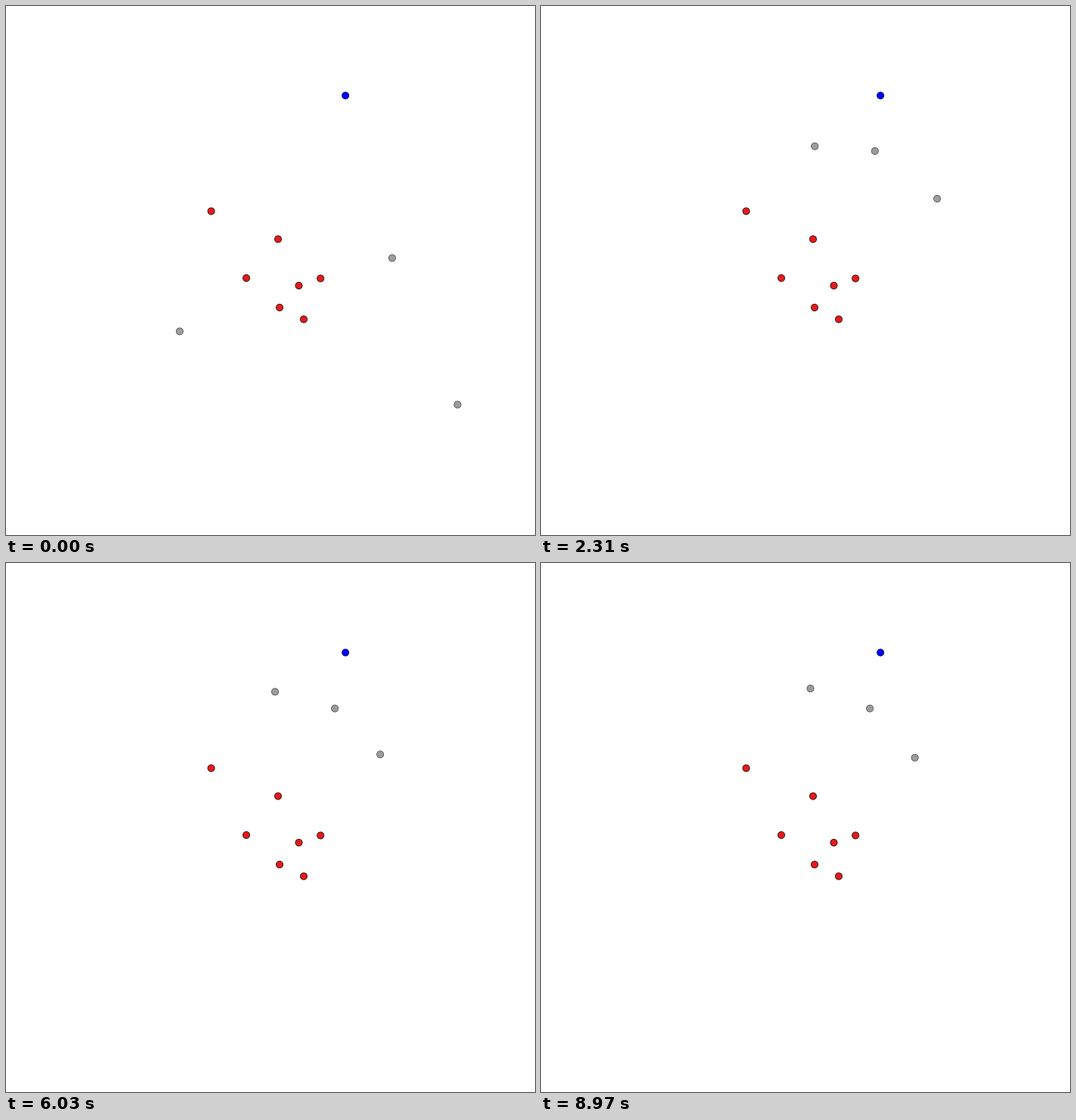
A matplotlib script that plays this animation: 700x700 px, repeating every 9 s.

```python
import numpy as np
import matplotlib.pyplot as plt
from matplotlib.animation import FuncAnimation
from matplotlib.patches import Circle

SIZE, DPI = 700, 100
FRAMES, INTERVAL = 300, 30

# Positions are complex numbers: x + y*1j, y pointing down
OBSTACLES = [271 + 271j, 359.5 + 308j, 317.5 + 359.5j, 387 + 369.5j,
             415.7 + 360j, 361.5 + 398.5j, 393.5 + 414j]
GOAL = 448.7 + 118j

# Each agent: start, gather, meet, fan out, rest
TIMES = np.array([0, 31, 47, 66, 97])
STOPS = np.array([
    [229.3 + 430j, 377 + 344j, 436.3 + 274j, 444 + 208j, 433 + 188.4j],
    [510.5 + 333j, 455 + 320j, 405 + 305j, 374 + 215j, 352 + 167.3j],
    [597 + 527j, 540 + 502j, 515 + 405j, 533 + 282j, 498.2 + 255.4j],
])

# At rest each agent steps round a small three-beat orbit
KICK = np.array([-1.1 - 2.4j, -2.5 - 0.3j, 2.5 + 0.3j])
SPIN = np.array([0, 1, 1])


def glide(n):
    """Smooth curve through the stops, at rest at both ends."""
    gap = np.diff(TIMES)
    slope = np.diff(STOPS) / gap
    speed = np.zeros_like(STOPS)
    speed[:, 1:-1] = ((gap[1:] * slope[:, :-1] + gap[:-1] * slope[:, 1:])
                      / (gap[1:] + gap[:-1]))
    n = min(n, TIMES[-1])
    i = min(np.searchsorted(TIMES, n, side="right") - 1, len(gap) - 1)
    u = (n - TIMES[i]) / gap[i]
    p, q = STOPS[:, i], STOPS[:, i + 1]
    a, b = speed[:, i] * gap[i], speed[:, i + 1] * gap[i]
    return (p + u * u * (3 - 2 * u) * (q - p)
            + u * (1 - u) ** 2 * a - u * u * (1 - u) * b)


def chatter(n):
    gain = np.clip((n - 85) / 15, 0, 1)
    turn = 2 * np.pi * (n - 1) / 3
    orbit = KICK * (np.cos(turn) + 1j * SPIN * np.sin(turn))
    return gain * (orbit - KICK)


fig = plt.figure(figsize=(SIZE / DPI, SIZE / DPI), dpi=DPI, facecolor="white")
ax = fig.add_axes([0, 0, 1, 1])
ax.set(xlim=(-0.5, SIZE - 0.5), ylim=(SIZE - 0.5, -0.5))
ax.axis("off")


def dot(z, color, edge="black"):
    return ax.add_patch(Circle((z.real, z.imag), 4.6, facecolor=color,
                               edgecolor=edge, linewidth=0.5))


for spot in OBSTACLES:
    dot(spot, "#e41a1c")
dot(GOAL, "#0000ff", "#000040")
agents = [dot(z, "#9c9c9c", "#404040") for z in STOPS[:, 0]]


def update(n):
    for agent, z in zip(agents, glide(n) + chatter(n)):
        agent.center = z.real, z.imag
    return agents


anim = FuncAnimation(fig, update, frames=FRAMES, interval=INTERVAL,
                     repeat=True, repeat_delay=0)
plt.show()
```
